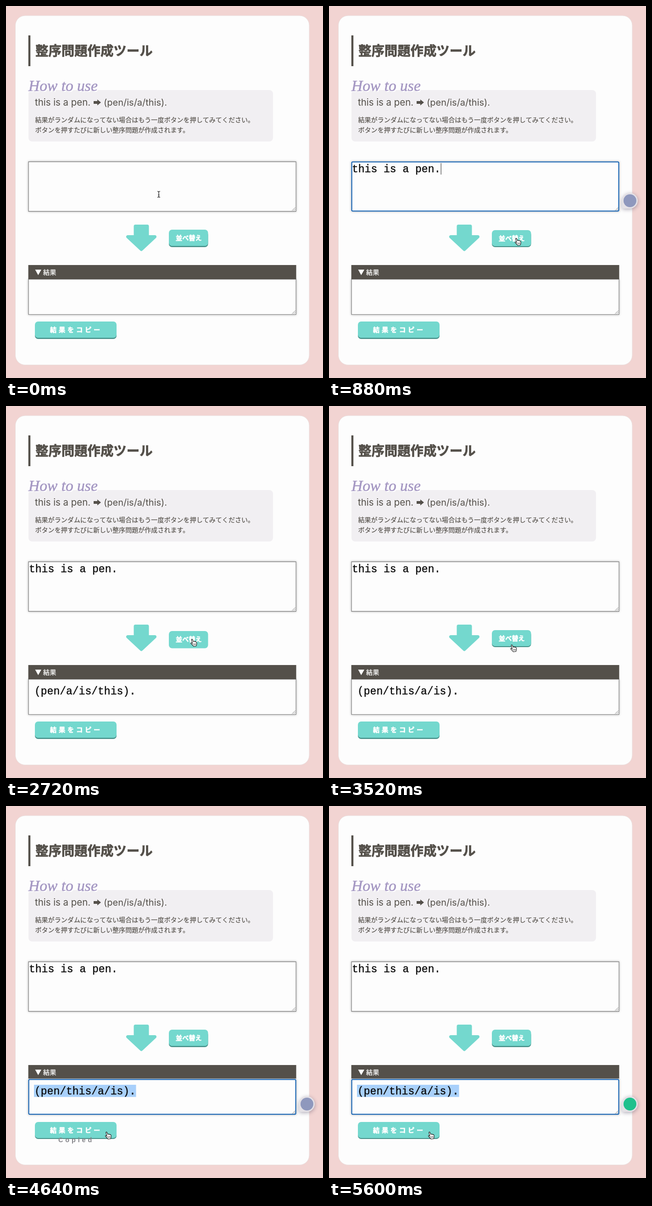
Animation of 691 by 810 pixels, one loop 5.68 s. Source, as an HTML page with a canvas:

```html
<!DOCTYPE html>
<html lang="ja">
<head>
<meta charset="utf-8">
<style>
html, body { margin: 0; width: 100%; height: 100%; overflow: hidden; background: #f2d4d2; }
canvas { display: block; }
</style>
</head>
<body>
<canvas id="stage" width="691" height="810"></canvas>
<script>
const ctx = document.getElementById('stage').getContext('2d');
const LOOP = 5680, STEP = 80;
const JP = '"Noto Sans CJK JP", "Noto Sans CJK", sans-serif';
const MONO = '"Liberation Mono", monospace';
const INK = '#54504a', TEAL = '#74d8ce', TEAL_DARK = '#469089', BLUE = '#0b5cb0';

const PHRASE = 'this is a pen.';
const TYPE_START = 160, TYPE_END = 640;
const FIRST_PRESS = 1040, COPY_PRESS = 4320, COPIED = 4400;
const PRESSES = [1040, 1360, 1680, 2000, 2320, 2720, 3040];
const RESULTS = [
  'a/is/this/pen', 'a/pen/is/this', 'pen/this/is/a', 'is/pen/a/this',
  'pen/a/is/this', 'this/is/pen/a', 'pen/this/a/is'
];
// time, x, y of the pointer
const PATH = [
  [0, 333, 410], [640, 345, 425], [880, 408, 506], [1040, 405.5, 508], [3440, 405.5, 508],
  [3760, 360, 585], [4080, 243, 696], [4240, 219, 710], [5680, 219, 710]
];

const clamp = v => Math.max(0, Math.min(1, v));
const ease = v => v * v * (3 - 2 * v);

function box(x, y, w, h, r, fill, stroke, line = 1) {
  ctx.beginPath();
  ctx.roundRect(x, y, w, h, r);
  if (fill) { ctx.fillStyle = fill; ctx.fill(); }
  if (stroke) { ctx.strokeStyle = stroke; ctx.lineWidth = line; ctx.stroke(); }
}

// weight: extra outline that thickens the letters
function text(str, x, y, font, color, weight = 0, gap = 0) {
  ctx.font = font;
  ctx.letterSpacing = gap + 'px';
  ctx.fillStyle = ctx.strokeStyle = color;
  ctx.fillText(str, x, y);
  if (weight) {
    ctx.lineWidth = weight;
    ctx.lineJoin = 'round';
    ctx.strokeText(str, x, y);
    ctx.lineJoin = 'miter';
  }
  ctx.letterSpacing = '0px';
}

function mono(str, x, y) {
  text(str, x, y, '23px ' + MONO, '#0b0b0b', 0.4);
}

function polygon(points) {
  ctx.beginPath();
  points.forEach(([x, y], i) => i ? ctx.lineTo(x, y) : ctx.moveTo(x, y));
  ctx.closePath();
}

function withShadow(color, blur, dy, draw) {
  ctx.save();
  ctx.shadowColor = color;
  ctx.shadowBlur = blur;
  ctx.shadowOffsetY = dy;
  draw();
  ctx.restore();
}

function field(x, y, w, h, focused) {
  withShadow('rgba(0,0,0,.32)', 5, 0, () => box(x, y, w, h, 1, '#fdfdfd'));
  if (focused) box(x + 1, y + 1, w - 2, h - 2, 2, '#fdfdfd', BLUE, 2);
  else box(x + .5, y + .5, w - 1, h - 1, 0, '#fdfdfd', '#707070', 1.1);
  ctx.strokeStyle = '#777';
  ctx.lineWidth = .9;
  ctx.beginPath();
  for (const d of [7, 3.5]) {
    ctx.moveTo(x + w - 2 - d, y + h - 2);
    ctx.lineTo(x + w - 2, y + h - 2 - d);
  }
  ctx.stroke();
}

// state: 0 idle, 1 hover, 2 pressed
function button(x, y, w, state, label, tx, gap) {
  const dy = [0, 1, 3][state];
  if (state < 2) box(x, y + 4, w, 34, 7, TEAL_DARK);
  box(x, y + dy, w, state === 2 ? 37.5 : 35.5 - dy * .5, 7, TEAL);
  text(label, tx, y + 23 + dy, 'bold 14.2px ' + JP, '#fff', .6, gap);
}

function bigArrow() {
  ctx.fillStyle = ctx.strokeStyle = TEAL;
  ctx.lineJoin = 'round';
  ctx.lineWidth = 7;
  polygon([[282, 479.5], [308, 479.5], [308, 502.5], [324.5, 502.5], [295, 530], [265.5, 502.5], [282, 502.5]]);
  ctx.fill();
  ctx.stroke();
  ctx.lineJoin = 'miter';
}

function badge(cy, color) {
  withShadow('rgba(60,50,80,.4)', 8, 2, () => box(639, cy - 17, 34, 34, [17, 17, 17, 4], '#e4e1e6'));
  ctx.fillStyle = color;
  ctx.beginPath();
  ctx.arc(656, cy, 14, 0, Math.PI * 2);
  ctx.fill();
}

function page() {
  ctx.fillStyle = '#f2d4d2';
  ctx.fillRect(0, 0, 691, 810);
  box(20.5, 21, 640.5, 760.5, 21, '#fdfdfd', '#eadfde');
  ctx.fillStyle = INK;
  ctx.fillRect(48.7, 64, 4.5, 67);
  text('整序問題作成ツール', 64, 108, 'bold 28.4px ' + JP, INK, .8);

  box(49, 183, 533, 112, 8, '#f1eff2');
  const script = 'italic 33.5px "Liberation Serif", serif';
  text('How to use', 51, 187, script, '#fff', .6);
  text('How to use', 49, 185, script, '#a598c3', .6);

  text('this is a pen.', 63, 217, '20.4px Inter, sans-serif', INK);
  ctx.fillStyle = INK;
  polygon([[191, 207], [199, 207], [199, 203.5], [207, 210], [199, 216.5], [199, 213], [191, 213]]);
  ctx.fill();
  text('(pen/is/a/this).', 213, 217, '20px Inter, sans-serif', INK);
  const small = '14.05px ' + JP;
  text('結果がランダムになってない場合はもう一度ボタンを押してみてください。', 63.5, 253.3, small, INK, .2);
  text('ボタンを押すたびに新しい整序問題が作成されます。', 63.5, 274.8, small, INK, .2);
  bigArrow();
}

function pointerAt(t) {
  let i = 0;
  while (i < PATH.length - 2 && t >= PATH[i + 1][0]) i++;
  const [t0, x0, y0] = PATH[i], [t1, x1, y1] = PATH[i + 1];
  const k = ease(clamp((t - t0) / (t1 - t0)));
  return [x0 + (x1 - x0) * k, y0 + (y1 - y0) * k];
}

function iBeam() {
  const d = new Path2D('M-3 -6.5Q0 -6.5 0 -4.5Q0 -6.5 3 -6.5M0 -5V5M-3 6.5Q0 6.5 0 4.5Q0 6.5 3 6.5M-1.5 1.5H1.5');
  ctx.strokeStyle = '#fff';
  ctx.lineWidth = 2.6;
  ctx.stroke(d);
  ctx.strokeStyle = '#111';
  ctx.lineWidth = 1.2;
  ctx.stroke(d);
}

function arrowPointer() {
  polygon([[0, 0], [0, 13], [3, 10.3], [5, 15], [7.2, 14], [5.2, 9.5], [9.2, 9.3]]);
  ctx.strokeStyle = '#fff';
  ctx.lineWidth = 2;
  ctx.stroke();
  ctx.fillStyle = '#000';
  ctx.fill();
}

function hand() {
  const d = new Path2D('M-1.3 .8Q-.2 -1 1.3 .8L2.8 5Q4 3.6 5.3 5Q6.5 4 7.6 5.5' +
    'Q9.4 4.9 9.9 7Q11 10.5 9.6 12.5L9.2 14.5L3.3 15.2Q1.6 12.5 -.8 10.8' +
    'Q-3.4 8.4 -1.9 7.7Q-.6 7.2 1 9Z');
  ctx.fillStyle = '#fff';
  ctx.fill(d);
  ctx.strokeStyle = '#111';
  ctx.lineWidth = 1.1;
  ctx.stroke(d);
  ctx.lineWidth = .8;
  ctx.stroke(new Path2D('M3.6 9.5L4.1 12.5M5.7 9.3L6.1 12.3M7.7 9L8 12'));
}

function pointer(t, x, y, over) {
  if (t >= TYPE_START && t < TYPE_END) return;
  ctx.save();
  ctx.translate(x, y);
  if (over) hand();
  else if (y < 447 || (y > 595 && y < 672)) iBeam();
  else arrowPointer();
  ctx.restore();
}

function render(t) {
  const [x, y] = pointerAt(t);
  const inside = (l, top, r, b) => x >= l && x <= r && y >= top && y <= b;
  const overSort = inside(355, 487, 440, 525);
  const overCopy = inside(63, 687, 241, 725);
  const held = at => t >= at && t < at + STEP;
  const typing = t >= 80 && t < FIRST_PRESS;
  const copied = t >= COPY_PRESS;

  page();
  field(48.6, 338.6, 584, 109, typing);
  const count = Math.round(PHRASE.length * clamp((t - 80) / (TYPE_END - 80)));
  mono(PHRASE.slice(0, count), 50, 362);
  if (typing) {
    ctx.fillStyle = '#222';
    ctx.fillRect(50.5 + count * 13.8, 342, 1, 25);
  }

  button(355, 487, 85.5, PRESSES.some(held) ? 2 : +overSort, '並べ替え', 370, 0);

  field(48.6, 594.5, 584, 77.8, copied);
  ctx.fillStyle = INK;
  ctx.fillRect(48.6, 564, 584, copied ? 29.5 : 31);
  ctx.fillStyle = '#fff';
  polygon([[63.5, 574], [77, 574], [70.2, 586]]);
  ctx.fill();
  text('結果', 81, 584.5, '500 14.2px ' + JP, '#fff', .3);

  const done = PRESSES.filter(p => t >= p + STEP).length;
  if (copied) {
    ctx.fillStyle = '#a8d0fb';
    ctx.fillRect(61, 607, 222.5, 26.5);
  }
  if (done) mono('(' + RESULTS[done - 1] + ').', 62, 628);

  button(63, 687, 178, held(COPY_PRESS) ? 2 : +overCopy, '結果をコピー', 96, 4.8);
  if (t >= COPIED) {
    ctx.globalAlpha = 1 - clamp((t - 4800) / 400);
    text('Copied', 114, 732, 'bold 14.4px "Liberation Sans", sans-serif', '#85858a', 0, 4.9);
    ctx.globalAlpha = 1;
  }

  if (typing && t >= TYPE_START) badge(424, '#8f98bd');
  if (t >= COPIED) badge(649, t < 5440 ? '#8f98bd' : '#1fc08c');
  pointer(t, x, y, overSort || overCopy);
}

const start = performance.now();
function frame() {
  const t = (performance.now() - start) % LOOP;
  render(Math.floor(t / STEP) * STEP);
  requestAnimationFrame(frame);
}
frame();
</script>
</body>
</html>
```
